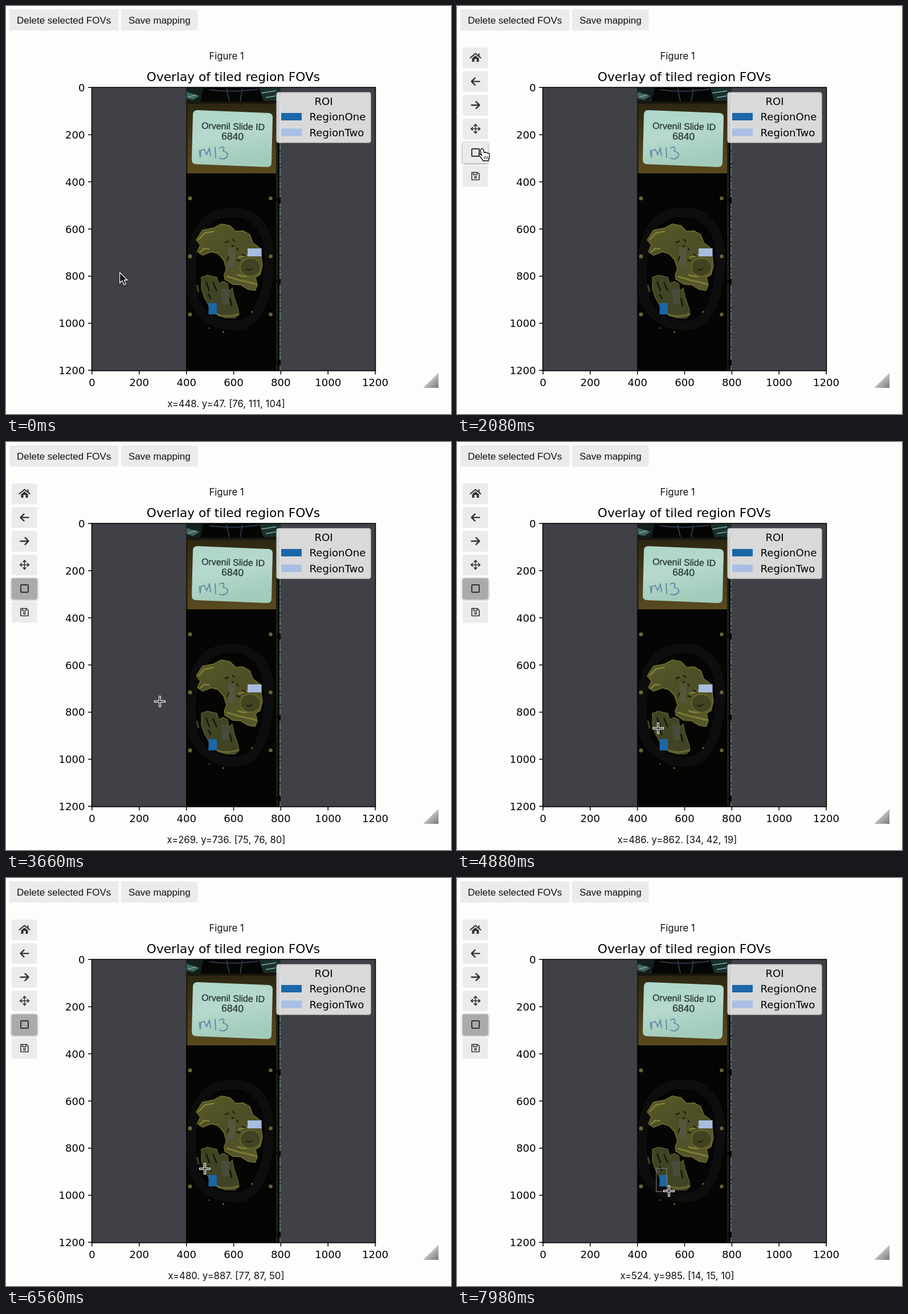
An HTML page that plays this animation: 781x717 px, repeating every 8000 ms.

```html
<!DOCTYPE html>
<html lang="en">
<head>
<meta charset="utf-8">
<title>Overlay of tiled region FOVs</title>
<style>
  html, body { margin: 0; width: 100%; height: 100%; overflow: hidden; background: #fdfdfb; }
  svg { display: block; }
  .plot { font: 18.1px "DejaVu Sans", sans-serif; }
  .page { font: 16.7px Inter, sans-serif; fill: #111; }
  .button { font: 17px "Liberation Sans", Arial, sans-serif; fill: #111; }
  .middle { text-anchor: middle; }
  .raised { filter: drop-shadow(0 1px 2px #0007); }
  .icon { fill: none; stroke: #333; stroke-width: 2; stroke-linecap: round; stroke-linejoin: round; }
</style>
</head>
<body>
<svg width="781" height="717" viewBox="0 0 781 717">
  <defs>
    <clipPath id="slideClip"><path d="M316 143H482V641H316z"/></clipPath>
    <filter id="soft"><feGaussianBlur stdDeviation="2"/></filter>
    <filter id="slightlySoft"><feGaussianBlur stdDeviation=".7"/></filter>
    <linearGradient id="brown" x2="0" y2="1">
      <stop stop-color="#2c2612"/><stop offset="1" stop-color="#5a4a20"/>
    </linearGradient>
    <linearGradient id="paper" x2=".3" y2="1">
      <stop stop-color="#acd6c8"/><stop offset=".5" stop-color="#b7d9cd"/><stop offset="1" stop-color="#a2cbbb"/>
    </linearGradient>
    <linearGradient id="tissue" x2=".6" y2="1">
      <stop stop-color="#585928"/><stop offset=".5" stop-color="#4d4e26"/><stop offset="1" stop-color="#56562a"/>
    </linearGradient>
    <linearGradient id="grip" x1=".3" y1=".3" x2="1" y2="1">
      <stop stop-color="#d8d8d8"/><stop offset="1" stop-color="#777"/>
    </linearGradient>
  </defs>

  <g class="button">
    <rect x="6" y="6" width="191.5" height="37" rx="2" fill="#ebebeb"/>
    <rect x="202" y="6" width="134.5" height="37" rx="2" fill="#ebebeb"/>
    <text x="19" y="31">Delete selected FOVs</text>
    <text x="215" y="31">Save mapping</text>
  </g>
  <g id="toolbar"></g>
  <text class="page middle" x="387" y="94">Figure 1</text>
  <path d="M759 645V671H732z" fill="url(#grip)"/>

  <path d="M151 143H648V641H151z" fill="#404146"/>
  <g clip-path="url(#slideClip)">
    <path d="M316 143H482V641H316z" fill="#050504"/>
    <g filter="url(#slightlySoft)">
      <path d="M316 143H347L341 168H316z" fill="#12211f"/>
      <path d="M444 143H482V167H452z" fill="#1b302d"/>
      <path d="M317 151L340 158L328 165L317 162" fill="#41645f"/>
      <path d="M320 160L334 156M448 153L474 149M456 161L473 158" stroke="#83a9a2" stroke-width="1.500"/>
      <path d="M357 147Q395 153 443 146M387 145L392 167M415 145L411 167" fill="none" stroke="#29384a" stroke-width="2"/>
    </g>
    <path d="M316 169H474V294H316z" fill="url(#brown)"/>
    <path d="M316 170H474" stroke="#1c170c" stroke-width="4"/>
    <path d="M316 170V294" stroke="#211b0d" stroke-width="5"/>
    <path d="M336 183L460 188Q468 188 468 196L466 275Q466 283 458 283L334 278Q326 278 326 270L328 191Q328 183 336 183z" fill="url(#paper)"/>
    <g fill="#263936" font-family="'Liberation Sans', Arial, sans-serif" transform="rotate(1.2 398 215)">
      <text class="middle" x="398.5" y="217" font-size="16" stroke="#263936" stroke-width=".3">Orvenil Slide ID</text>
      <text class="middle" x="398" y="235" font-size="17.5" stroke="#263936" stroke-width=".3">6840</text>
    </g>
    <path d="M339 253L341 266L342 254L348 252L352 261L357 250L359 264M367 248L368 267M374 250Q386 244 381 255Q392 258 388 265Q382 271 374 267" fill="none" stroke="#5d86a6" stroke-width="1.800"/>

    <path d="M386 363C428 356 455 385 461 424C466 477 452 535 426 555C396 572 348 556 331 520C320 485 325 437 333 408C345 376 362 367 386 363z" fill="none" stroke="#0f0f09" stroke-width="17" filter="url(#soft)"/>
    <g filter="url(#slightlySoft)" fill="none">
      <path d="M334 411L345 394L365 390L378 383L393 386L403 396L416 395L428 402L433 416L446 426L450 456L446 472L438 477L441 491L437 500L425 498L412 490L398 489L384 480L383 472L387 462L382 446L372 435L360 432L345 438L336 432L341 420z" fill="url(#tissue)" stroke="#6f702f" stroke-width="1.500"/>
      <path d="M338 411L349 399L365 396M340 433L348 426L357 427M407 442Q422 440 440 428M406 472Q428 482 446 461M387 475L410 482L425 485L440 489" stroke="#96953e" stroke-width="2.500" opacity=".7"/>
      <ellipse cx="429" cy="459" rx="18" ry="16" fill="#424321" stroke="#65652d" stroke-width="2"/>
      <path d="M390 424H402V458H389z" fill="#555944" opacity=".8"/>
      <path d="M384 416l7-3M397 410l5 4M405 425l3 5M396 423l4-2M414 436l7 3M422 463l5 1 5-3M391 440l-3 8M404 446l7 2" stroke="#17170c" stroke-width="2"/>

      <path d="M343 477L353 473L370 477L373 488L381 484L389 488L391 501L397 496L400 511L407 531L409 542L402 548L386 548L372 544L358 530L348 512L343 497z" fill="#404424" stroke="#5b5c2b" stroke-width="1.500"/>
      <path d="M377 497H391V524H380z" fill="#485041" opacity=".8"/>
      <path d="M351 484L357 501M363 485L370 501M355 506l5 9M393 513l3 14" stroke="#14160b" stroke-width="2.500"/>
      <path d="M335 490l3 13" stroke="#474521" stroke-width="3"/>
      <path d="M370 541Q388 549 408 541" stroke="#6a6934" stroke-width="3"/>
    </g>
    <g id="dots" fill="#68643b"></g>
    <path d="M356 566h1M380.500 573h2M431 537.500h2" stroke="#a9a869" stroke-width="2"/>
    <path d="M475.500 168V641" stroke="#2f2918" stroke-width="2"/>
    <path d="M481 168V641" stroke="#587d77" stroke-width="2"/>
    <path d="M481 168V641" stroke="#20312f" stroke-width="2" stroke-dasharray="2 5 1 8 3 4"/>
    <g id="notches" fill="#050504"></g>
  </g>
  <path d="M355.500 522H370V542H355.500z" fill="#1c66a5"/>
  <path d="M424 426H448.500V440H424z" fill="#a9bcdf"/>
  <rect id="selection" fill="none" stroke="#777" stroke-width="1.200"/>

  <g class="plot">
    <text class="middle" x="399" y="132" font-size="21.7">Overlay of tiled region FOVs</text>
    <g id="axes"></g>
    <path d="M150.500 143H648.500V641H150.500z" fill="none" stroke="#000" stroke-width="1.500"/>
    <rect x="475" y="152" width="165" height="88" rx="3.500" fill="#fff" fill-opacity=".8" stroke="#ccc" stroke-opacity=".8" stroke-width="1.500"/>
    <text class="middle" x="557.500" y="174">ROI</text>
    <path d="M483 188H519V201H483z" fill="#1c67a7"/>
    <path d="M483 215.500H519V228.500H483z" fill="#a8bee3"/>
    <text x="532.500" y="201">RegionOne</text>
    <text x="532.500" y="228.500">RegionTwo</text>
  </g>
  <text id="status" class="page middle" x="386.500" y="705"></text>

  <g id="arrow"><path class="raised" d="M.700 1.500V19.500L5 15.700L8 22.800L11.200 21.500L8.300 14.500H14z" fill="#000" stroke="#fff" stroke-width="1.300"/></g>
  <g id="hand"><path d="M-2 1Q0 -2 2 1L4 7Q6 5 7 7Q9 6 10 8Q13 7 13 10L13 15Q12 18 11 21H2L-3 14Q-7 11 -5 9Q-3 9 -1 11L-3 3z" fill="#fff" stroke="#000" stroke-width="1.300"/><path d="M4 13v5M7 13v5M10 13v5" stroke="#000"/></g>
  <g id="cross" fill="none"><path d="M-10 0H10M0 -10V10" stroke="#fff" stroke-width="4"/><path d="M-9 0H9M0 -9V9" stroke="#222" stroke-width="1.600"/></g>
</svg>
<script>
const $ = id => document.getElementById(id);
const DURATION = 8000, PRESS = 2450, LEAVE = 1400, DRAG = 6600;
const ORIGIN = [151, 143], SCALE = 0.4142;

const icons = [
  '<path d="M-9 0L0-7.500L9 0M6-7v3" stroke-width="2.200"/><path d="M-6 1L0-4L6 1V7H2V2H-2V7H-6z" fill="#333" stroke="none"/>',
  '<path d="M7 0H-6M-1-6L-7 0L-1 6" stroke-width="2.400"/>',
  '<path d="M-7 0H6M1-6L7 0L1 6" stroke-width="2.400"/>',
  '<path d="M-7 0H7M0-7V7M-5-2.500L-8 0L-5 2.500M5-2.500L8 0L5 2.500M-2.500-5L0-8L2.500-5M-2.500 5L0 8L2.500 5" stroke-width="1.600"/>',
  '<rect x="-6.500" y="-6.500" width="13" height="13" rx="1"/>',
  '<path d="M-6.500-6.500H3.500L6.500-3.500V6.500H-6.500zM-3.500-6V-2.500H2.500V-6" stroke-width="1.600"/><circle cy="2" r="1.700" stroke-width="1.500"/>'
];
$('toolbar').innerHTML = icons.map((icon, i) => {
  const y = 73 + 41.6 * i;
  return `<rect x="10" y="${y}" width="44.500" height="36.500" rx="2" fill="#ebebeb"/>
    <g class="icon" transform="translate(32.500 ${y + 18})">${icon}</g>`;
}).join('');
const zoomButton = $('toolbar').querySelectorAll(':scope > rect')[4];

$('dots').innerHTML = [338, 440, 542].map(y =>
  `<circle cx="323" cy="${y}" r="3.500"/><circle cx="464.500" cy="${y}" r="3.300"/>`).join('');
$('notches').innerHTML = [341, 484, 627].map(y => `<circle cx="480" cy="${y}" r="5"/>`).join('');

let axes = '';
for (let value = 0; value <= 1200; value += 200) {
  const x = ORIGIN[0] + value * SCALE, y = ORIGIN[1] + value * SCALE + .3;
  axes += `<path d="M${x} 641v6.500M150.500 ${y}h-6.500" stroke="#000" stroke-width="1.500"/>
    <text class="middle" x="${x}" y="668">${value}</text>
    <text x="138.500" y="${y + 6.700}" text-anchor="end">${value}</text>`;
}
$('axes').innerHTML = axes;

const linear = u => u;
const easeIn = u => u * u;
const easeOut = u => 1 - (1 - u) ** 2;
const smooth = u => u * u * (3 - 2 * u);

// time, [pointer x, y, plot x, y, red, green, blue], easing towards the next key
const keys = [
  [0, [199, 467, 448, 47, 76, 111, 104], smooth],
  [1240, [53, 330, 448, 47, 76, 111, 104], smooth],
  [1800, [44, 251, 448, 47, 76, 111, 104], linear],
  [2500, [44, 251, -258, 261, 75, 76, 80], easeIn],
  [3660, [270, 456, 269, 736, 75, 76, 80], linear],
  [3760, [270, 456, 269, 736, 75, 76, 80], easeOut],
  [4500, [353, 503, 486, 862, 34, 42, 19], linear],
  [4900, [353, 503, 486, 862, 34, 42, 19], smooth],
  [5600, [349, 511, 480, 887, 77, 87, 50], linear],
  [DRAG, [349, 511, 480, 887, 77, 87, 50], linear],
  [7980, [372, 550, 524, 985, 14, 15, 10], linear],
  [DURATION, [372, 550, 524, 985, 14, 15, 10], linear]
];

function pose(time) {
  const i = keys.findIndex(key => key[0] > time);
  const [start, from, ease] = keys[i - 1], [end, to] = keys[i];
  const u = ease((time - start) / (end - start));
  return from.map((value, j) => value + (to[j] - value) * u);
}

function draw(time) {
  const [x, y, ...reading] = pose(time);
  let [plotX, plotY, ...color] = reading.map(Math.round);
  const pressed = time >= PRESS;
  const overToolbar = x < 55 && y < 318;
  const inPlot = x > ORIGIN[0];

  $('toolbar').setAttribute('opacity', Math.min(1, Math.max(0, (time - 1150) / 300)));
  zoomButton.setAttribute('fill', pressed ? '#aaa' : '#ebebeb');
  zoomButton.classList.toggle('raised', pressed || overToolbar && y > 240 && y < 277);

  const kind = overToolbar ? 'hand' : pressed && inPlot ? 'cross' : 'arrow';
  for (const id of ['arrow', 'hand', 'cross']) {
    $(id).setAttribute('display', id === kind ? 'inline' : 'none');
    $(id).setAttribute('transform', `translate(${x} ${y})`);
  }

  if (pressed && plotX < 400) color = [75, 76, 80];
  const showStatus = time < LEAVE || pressed && inPlot && plotX >= 0;
  $('status').textContent = showStatus ? `x=${plotX}. y=${plotY}. [${color.join(', ')}]` : '';

  const box = $('selection');
  box.setAttribute('display', time > DRAG ? 'inline' : 'none');
  box.setAttribute('x', ORIGIN[0] + 480 * SCALE);
  box.setAttribute('y', ORIGIN[1] + 887 * SCALE);
  box.setAttribute('width', Math.max(0, reading[0] - 480) * SCALE);
  box.setAttribute('height', Math.max(0, reading[1] - 887) * SCALE);
}

const began = performance.now();
function tick() {
  draw((performance.now() - began) % DURATION);
  requestAnimationFrame(tick);
}
tick();
</script>
</body>
</html>
```
